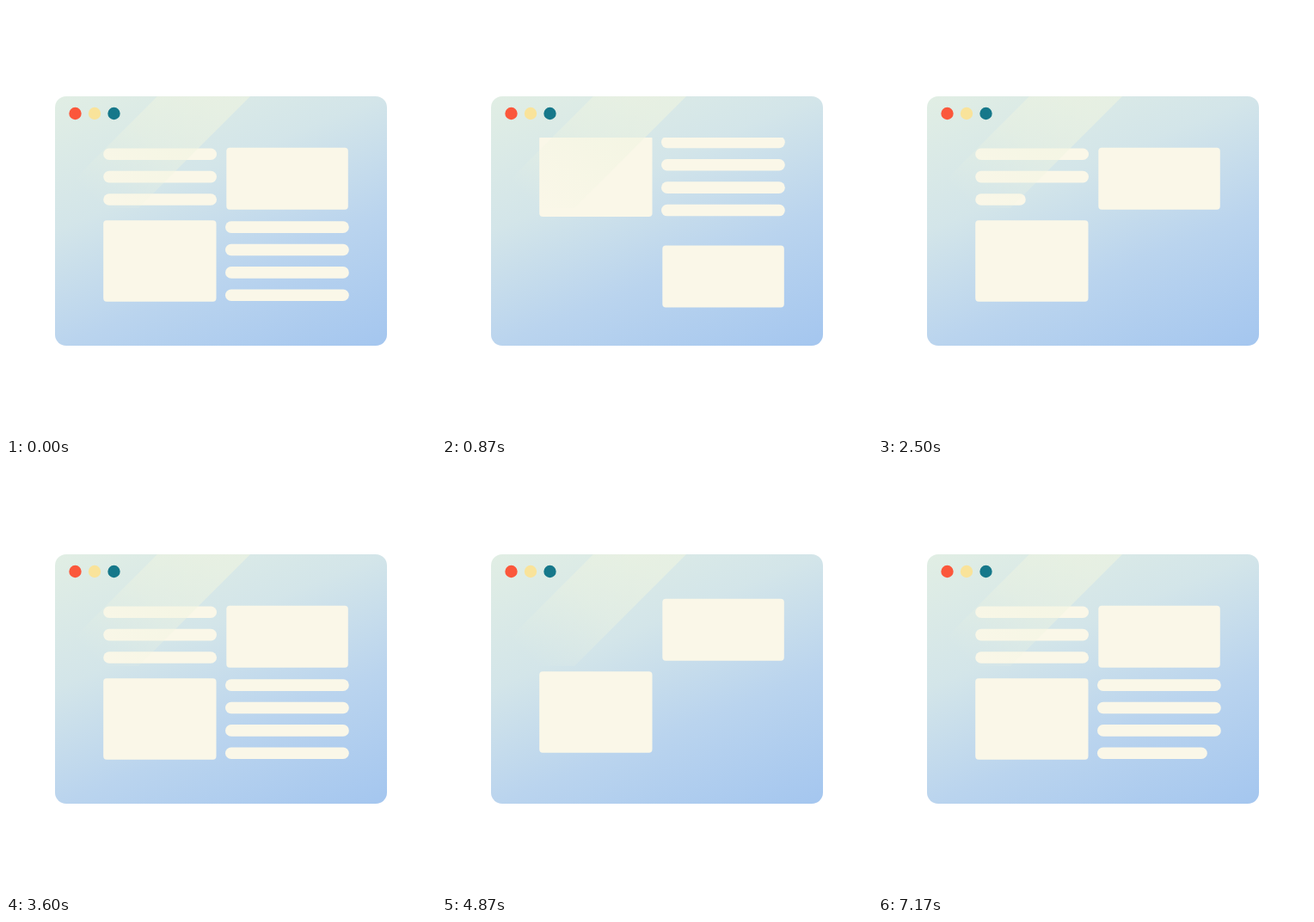
Recreate the animation shown at these times as an HTML page. Size 500 px wide and 500 px high, loop 7210 ms.

```html
<!DOCTYPE html>
<html lang="en">
<head>
<meta charset="utf-8">
<title>Scrolling page</title>
<style>
  html, body { margin: 0; width: 100%; height: 100%; overflow: hidden; background: #fff; }
  svg { display: block; width: 100vw; height: 100vh; }
</style>
</head>
<body>
<svg viewBox="0 0 500 500">
  <defs>
    <linearGradient id="sky" gradientUnits="userSpaceOnUse" x1="57" y1="105" x2="214" y2="489">
      <stop offset="0" stop-color="#e1eee4"/>
      <stop offset=".35" stop-color="#d3e5e9"/>
      <stop offset=".65" stop-color="#bad4ee"/>
      <stop offset="1" stop-color="#a4c6ef"/>
    </linearGradient>
    <linearGradient id="shine" gradientUnits="userSpaceOnUse" x1="230" y1="105" x2="105" y2="230">
      <stop offset="0" stop-color="#eff4e0" stop-opacity=".6"/>
      <stop offset=".45" stop-color="#eff4e0" stop-opacity=".42"/>
      <stop offset="1" stop-color="#eff4e0" stop-opacity="0"/>
    </linearGradient>
    <clipPath id="view"><rect x="100" y="153" width="310" height="202"/></clipPath>
  </defs>
  <rect x="57" y="105" width="386" height="290" rx="13" fill="url(#sky)"/>
  <circle cx="80.5" cy="125" r="7.2" fill="#fb573b"/>
  <circle cx="103" cy="125" r="7.2" fill="#f9e39a"/>
  <circle cx="125.5" cy="125" r="7.2" fill="#16788a"/>
  <g clip-path="url(#view)" fill="#faf7e8">
    <g id="before"></g>
    <g id="after"></g>
  </g>
  <path d="M176 105H284L154 235H57V224Z" fill="url(#shine)"/>
</svg>
<script>
const NS = 'http://www.w3.org/2000/svg';
const LOOP = 7210, HALF = 3600, STEP = 100 / 3;
const PAGE = 212.5, OVERSHOOT = 8;
const LINE_H = 13.6;

const before = document.getElementById('before');
const after = document.getElementById('after');
const clamp = v => Math.max(0, Math.min(1, v));
const ease = v => { const k = clamp(v); return k * k * (3 - 2 * k); };

function rect(parent, x, y, width, height, rx) {
  const el = document.createElementNS(NS, 'rect');
  Object.entries({ x, y, width, height, rx }).forEach(([k, v]) => el.setAttribute(k, v));
  parent.appendChild(el);
  return el;
}

// Two cards and seven text lines, in typing order
function buildPage(parent) {
  rect(parent, 256.3, 164.7, 141.5, 72, 4);
  rect(parent, 113.2, 249.2, 131.3, 94.5, 4);
  const lines = [];
  const column = (x, y, width, count) => {
    for (let i = 0; i < count; i++) {
      const el = rect(parent, x, y + i * 26.4 - LINE_H / 2, width, LINE_H, LINE_H / 2);
      lines.push({ el, width });
    }
  };
  column(113.2, 172.2, 131.8, 3);
  column(255, 257.1, 143.8, 4);
  return lines;
}

buildPage(before);
const typed = buildPage(after);

function scrollAt(frame) {
  const peak = 37.5;
  return frame < peak
    ? (PAGE + OVERSHOOT) * ease((frame - 16) / (peak - 16))
    : PAGE + OVERSHOOT * (1 - ease((frame - peak) / (46 - peak)));
}

function draw(ms) {
  const t = ms % LOOP;
  const local = t < HALF ? t : t - HALF;
  const frame = Math.min(107, Math.floor((local + 4) / STEP));
  const y = scrollAt(frame);
  before.setAttribute('transform', `translate(0 ${-y})`);
  after.setAttribute('transform', `translate(0 ${PAGE - y})`);
  typed.forEach(({ el, width }, i) => {
    const k = clamp((frame - 57 - 7 * i) / 9);
    el.setAttribute('width', k && Math.max(LINE_H, width * k));
  });
}

const start = performance.now();
function tick() {
  draw(performance.now() - start);
  requestAnimationFrame(tick);
}
draw(0);
requestAnimationFrame(tick);
</script>
</body>
</html>
```
